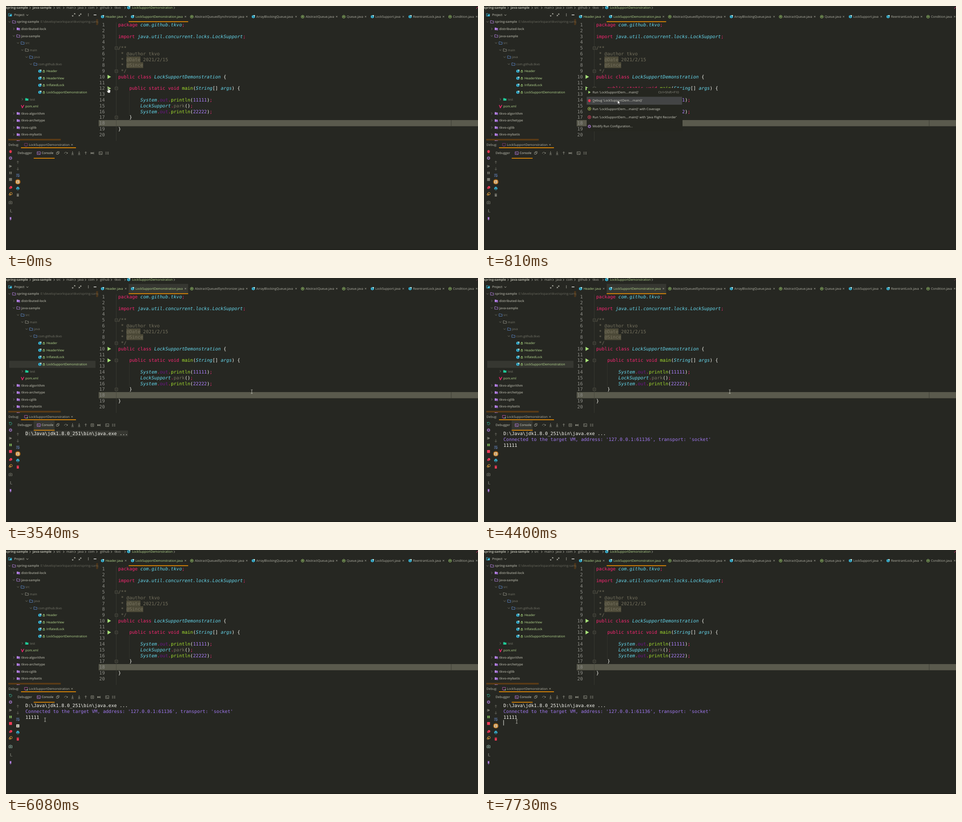
An HTML page with a canvas that plays this animation: 1039 px wide and 539 px high, repeating every 8000 ms.

```html
<!DOCTYPE html>
<html lang="en">
<head>
<meta charset="utf-8">
<title>Debug session</title>
<style>
html, body { margin: 0; width: 100%; height: 100%; overflow: hidden; background: #262722; }
canvas { display: block; }
</style>
</head>
<body>
<canvas id="stage" width="1039" height="539"></canvas>
<script>
const g = document.getElementById('stage').getContext('2d');
const LOOP = 8000, ADV = 6.1, PITCH = 12.77, CODE_X = 247;
const BG = '#262722', ORANGE = '#ff9800', PINK = '#f92672', CYAN = '#66d9ef', GREEN = '#a9dc76';
const PURPLE = '#b884e8', GREY = '#929287', DIM = '#77776b', LIGHT = '#b4b4a8', WHITE = '#f8f8f2';
const TEAL = '#3db8d8', FILE = '#b9dd92', ACTIVE = '#363731';
const UI = '6.93px "Open Sans", sans-serif', MONO = '10.13px "DejaVu Sans Mono", monospace';
const STYLES = { k: PINK, t: CYAN, m: '#a6e22e', n: '#ae81ff', c: '#75715e', w: WHITE, o: '#6e1688' };
g.textRendering = 'geometricPrecision';

const CODE = [
  '~kpackage ~tcom.github.tkvo~k;', '', '~kimport ~tjava.util.concurrent.locks.LockSupport~k;', '',
  '~c/**', '~c * @author tkvo', '~c * @Date 2021/2/15', '~c * @Since', '~c */',
  '~kpublic class ~tLockSupportDemonstration ~w{', '',
  '~w    ~kpublic static void ~mmain~w(~tString~w[] ~targs~w) {', '',
  '~w        ~tSystem~k.~oout~k.~mprintln~w(~n11111~w)~k;',
  '~w        ~tLockSupport~k.~cpark~w()~k;',
  '~w        ~tSystem~k.~oout~k.~mprintln~w(~n22222~w)~k;',
  '~w    }', '', '~w}', ''
];

// level, label, kind
const TREE = [
  [0, 'spring-sample', 'root'], [1, 'distributed-lock', 'module'], [1, 'java-sample', 'root'],
  [2, 'src', 'src'], [3, 'main', 'dir'], [4, 'java', 'src'], [5, 'com.github.tkvo', 'src'],
  [6, 'Header', 'class'], [6, 'HeaderView', 'class'], [6, 'InflatedLock', 'class'],
  [6, 'LockSupportDemonstration', 'class'], [3, 'test', 'test'], [3, 'pom.xml', 'pom'],
  [1, 'tkvo-algorithm', 'module'], [1, 'tkvo-archetype', 'module'],
  [1, 'tkvo-cglib', 'module'], [1, 'tkvo-mybatis', 'module']
];

const TABS = [
  ['Header', 219, 263.5], ['LockSupportDemonstration', 285, 395],
  ['AbstractQueuedSynchronizer', 415.5, 530, 1], ['ArrayBlockingQueue', 551, 638.5],
  ['AbstractQueue', 659.5, 728, 1], ['Queue', 750, 791.5, 1], ['LockSupport', 813, 874.5],
  ['ReentrantLock', 896, 963], ['Condition', 984, 1036, 1]
];

const MENU = [
  ["Run 'LockSupportDem....main()'", 190.5], ["Debug 'LockSupportDem....main()'", 209],
  ["Run 'LockSupportDem....main()' with Coverage", 227.5],
  ["Run 'LockSupportDem....main()' with 'Java Flight Recorder'", 245.5],
  ['Modify Run Configuration...', 266]
];

// time, x, y, shape
const POINTER = [
  [0, 226, 186, 'hand'], [150, 227, 186, 'arrow'], [300, 238, 189, 'arrow'], [420, 262, 197, 'arrow'],
  [540, 283, 204, 'arrow'], [660, 293, 208, 'arrow'], [810, 294, 208, 'arrow'], [2530, 295, 208, 'beam'],
  [2680, 430, 300, 'beam'], [2800, 541, 251, 'beam'], [5360, 506, 265, 'beam'], [5510, 234, 367, 'beam'],
  [5660, 121, 380, 'beam'], [5780, 94, 385, 'beam'], [6080, 86, 375, 'beam'], [6230, 62, 370, 'beam'],
  [6350, 49, 368, 'beam'], [6500, 55, 371, 'beam'], [6620, 88, 378, 'beam'], [6740, 111, 382, 'beam'],
  [7010, 88, 390, 'beam'], [7160, 84.5, 391, 'beam'], [7460, 56, 387, 'beam'], [7610, 62, 383, 'beam'],
  [7730, 72, 379, 'beam']
];

function box(x, y, w, h, color) {
  g.fillStyle = color;
  g.fillRect(x, y, w, h);
}

function text(s, x, y, color = GREY, bold = false) {
  g.font = (bold ? 'bold ' : '') + UI;
  g.fillStyle = color;
  g.fillText(s, x, y + 2.4);
}

function mono(s, x, y, color, italic = false) {
  g.font = (italic ? 'italic ' : '') + MONO;
  g.fillStyle = color;
  g.fillText(s, x, y + 3.5);
}

function icon(x, y, d, color, fill = false, width = 0.9) {
  g.save();
  g.translate(x, y);
  g.fillStyle = g.strokeStyle = color;
  g.lineWidth = width;
  const p = new Path2D(d);
  fill ? g.fill(p) : g.stroke(p);
  g.restore();
}

function dot(x, y, r, color, ring = false) {
  g.beginPath();
  g.arc(x, y, r, 0, 7);
  g.fillStyle = g.strokeStyle = color;
  g.lineWidth = 1;
  ring ? g.stroke() : g.fill();
}

const right = (x, y, c = DIM) => icon(x, y, 'M-1.2-2.2L1.2 0L-1.2 2.2', c);
const down = (x, y, c = DIM) => icon(x, y, 'M-2.2-1.2L0 1.2L2.2-1.2', c);
const cross = (x, y) => icon(x, y, 'M-1.6-1.6L1.6 1.6M1.6-1.6L-1.6 1.6', LIGHT, false, 0.8);
const folder = (x, y, c, fill) => icon(x, y, 'M-3.5-2.7H-.6L.4-1.7H3.5V2.8H-3.5Z', c, fill);
const arrow = (x, y, dir, c = GREY) => icon(x, y, `M0 ${-3 * dir}V${3 * dir}M-2.3 ${dir * .7}L0 ${3 * dir}L2.3 ${dir * .7}`, c);
const terminal = (x, y, c = GREY) => icon(x, y, 'M-3.5-3H3.5V3H-3.5ZM-2-1.4L-.4 0L-2 1.4M.4 1.5H2.2', c);
const list = (x, y) => icon(x, y, 'M-3.5-2.2H-1M.5-2.2H3.5M-3.5 0H-1M.5 0H3.5M-3.5 2.2H-1M.5 2.2H3.5', GREY);
const play = (x, y) => icon(x, y, 'M-3.5-4.5L4.2 0L-3.5 4.5Z', '#a8e27a', true);

function classIcon(x, y, abstract) {
  if (abstract) {
    icon(x, y, 'M-3-1.5L0-3.2L3-1.5V2L0 3.5L-3 2Z', GREEN);
    dot(x, y, 1.3, GREEN);
    return;
  }
  icon(x, y, 'M-3.4-2L0-3.6L3.4-2V2L0 3.7L-3.4 2Z', TEAL, true);
  icon(x, y, 'M-2-1.2L0 0L2-1.2M0 0V2.6', '#17546a', false, 0.8);
  dot(x + 2.3, y - 2.2, 1.3, '#e8f3df');
}

function gear(x, y, c = PURPLE) {
  dot(x, y, 2.1, c, true);
  for (let i = 0; i < 8; i++) {
    const a = i * Math.PI / 4;
    dot(x + 3 * Math.cos(a), y + 3 * Math.sin(a), 0.8, c);
  }
}

function bug(x, y) {
  icon(x, y, 'M-3.2-2L3.2 2M-3.2 2L3.2-2M-3.4 0H3.4', '#e8324f', false, 0.7);
  icon(x, y, 'M0-3.3C3-3.3 3 3.4 0 3.4S-3-3.3 0-3.3', '#f0364f', true);
}

function drawTop(focused) {
  text('spring-sample', -0.5, 4, LIGHT, true);
  text('java-sample', 58.5, 4, LIGHT, true);
  [['src', 111], ['main', 133], ['java', 158], ['com', 181], ['github', 207], ['tkvo', 239]]
    .forEach(([s, x]) => text(s, x, 4, LIGHT));
  [53, 106, 127, 152, 175, 200, 232, 262, 370.5].forEach(x => right(x, 4, LIGHT));
  classIcon(270, 3.5);
  text('LockSupportDemonstration', 277.5, 4, FILE);
  icon(1037, 3, 'M-2 3L2-1', focused ? '#7a4058' : PINK);

  if (focused) box(270, 13, 131, 21, ACTIVE);
  TABS.forEach(([name, x, close, abstract], i) => {
    classIcon(x - 6.5, 23.5, abstract);
    text(name + '.java', x, 23.5, i < 2 ? FILE : LIGHT);
    cross(close, 23.5);
  });
  box(270, 33.8, 131, 1.6, ORANGE);
}

function drawTree(focused) {
  folder(9, 19.5, TEAL);
  box(8, 19, 4, 3.5, TEAL);
  text('Project', 18, 19.8, '#d0d0c4');
  down(47, 20, LIGHT);
  icon(149, 19.5, 'M.8-.8L3-3M.8-3H3V-.8M-.8.8L-3 3M-3 .8V3H-.8', '#d0d0c4');
  icon(163, 19.5, 'M.8-.8L3-3M.8-3V-.8H3M-.8.8L-3 3M-.8 3V.8H-3', '#d0d0c4');
  [-2.3, 0, 2.3].forEach(d => dot(181.3, 19.5 + d, 0.7, '#d0d0c4'));
  box(193, 19, 6, 1.3, WHITE);

  if (focused) box(7, 183, 190, 15.5, ACTIVE);
  g.save();
  g.beginPath();
  g.rect(0, 28, 203, 270);
  g.clip();
  TREE.forEach(([level, label, kind], i) => {
    const y = 35 + 15.56 * i, x = 7.7 + 9.4 * level;
    const bold = kind === 'root' || kind === 'module';
    const leaf = kind === 'class' || kind === 'pom';
    if (!leaf) {
      (kind === 'module' || kind === 'test' ? right : down)(x, y);
      const c = { src: '#5d86c4', test: '#20c997', dir: GREY }[kind] || PURPLE;
      folder(x + 10, y, c, kind === 'test' || kind === 'module');
      if (kind === 'module') box(x + 10.5, y, 3.4, 3.4, '#7d55a8');
      text(label, x + 16.3, y, bold ? GREY : DIM, bold);
    } else if (kind === 'class') {
      classIcon(74.5, y);
      icon(83.2, y, 'M-1.8-.4H1.8V2.5H-1.8ZM-1.1-.4V-2H1.1V-.4', '#9bc873', false, 0.9);
      text(label, 89, y, FILE);
    } else {
      icon(36.5, y, 'M-3-3L-.5 3L3-3', PINK, false, 1.5);
      text(label, 42.5, y, FILE);
    }
  });
  text('E:\\develop\\workspace\\tkvo\\spring-sample', 76, 35, '#6b6b60');
  folder(27, 299, PURPLE, true);
  g.restore();
  box(198.5, 29, 4, 13, 'rgba(130,76,15,.4)');
  box(5, 293.5, 115.5, 3.6, '#5b3b16');
}

function drawEditor(caret) {
  box(204, 252, 835, 13.6, '#5a5a4d');
  box(979.5, 252, 1, 13.6, '#3d3d35');
  box(242.5, 36, 0.7, 262, '#41423a');
  box(271, 188, 0.6, 51, '#3b3c34');
  box(265, 111.5, 31, 12.8, '#4d4a38');
  box(265, 124.3, 37, 12.8, '#4d4a38');
  CODE.forEach((line, i) => {
    const y = 41.5 + PITCH * i;
    g.textAlign = 'right';
    mono(i + 1, 217.5, y, '#90908a');
    g.textAlign = 'left';
    let col = 0;
    for (const part of line.split('~').slice(1)) {
      const s = part.slice(1);
      mono(s, CODE_X + col * ADV, y, STYLES[part[0]], part[0] === 't');
      col += s.length;
    }
  });
  for (const y of [93, 144, 182, 246]) {
    box(239.5, y - 3.5, 7, 7, BG);
    icon(243, y, 'M-3-3H3V3H-3ZM-1.5 0H1.5', '#5d5e52', false, 0.8);
  }
  play(227, 156.5);
  play(227, 182);
  if (caret) box(247, 252, 1, 13, WHITE);
}

function drawDebug(t) {
  const live = t >= 3540;
  const tabOn = live && t < 5660;
  text('Debug:', 5.5, 306.5, LIGHT);
  icon(44, 306.5, 'M-3.3-3H3.3V2.5H-3.3ZM-1.5 3.5H1.5', live ? '#b357a8' : '#7c3b70');
  if (live) dot(47, 309, 1.2, '#6fe08a');
  text('LockSupportDemonstration', 50.5, 306.5, LIGHT);
  cross(145.3, 306.5);
  box(33, 312.4, 121, 1.6, ORANGE);

  text('Debugger', 25.5, 325, '#c2c2b6');
  if (tabOn) box(61, 315, 46, 21, ACTIVE);
  terminal(72, 325, '#b47bd8');
  text('Console', 78.5, 325, '#dadace');
  box(61, 335.6, 46, 1.5, ORANGE);
  icon(114, 324.5, 'M-3-1H1V3H-3ZM-1-1V-3H3V1H1', GREY);
  icon(132, 325, 'M-3.5 1C-3-3 2-3 3 .5M1-.2L3.2 1L3.6-1.6M-.5 2.5H.5', GREY);
  [146.5, 161].forEach(x => { arrow(x, 324, 1); box(x - 2.5, 328, 5, 0.8, GREY); });
  arrow(175.5, 325, -1);
  const shift = live ? 14.5 : 0;
  if (live) icon(190, 325, 'M-3-3H3V3H-3ZM0-2V1M-1.5-.3L0 1.2L1.5-.3', GREY);
  icon(190 + shift, 325, 'M-3.5-2.5L-.3 0L-3.5 2.5ZM-.3-2.5L2.5 0L-.3 2.5ZM2.6-2.5H3.6V2.5H2.6Z', GREY, true);
  terminal(208.3 + shift, 325);
  list(222.5 + shift, 325);

  if (live) {
    icon(10, 321.5, 'M-2.4-1.6A2.9 2.9 0 1 1-2.8 1M-2.8-3.3V-1.2H-.6', '#35b99b');
  } else bug(10, 321.5);
  gear(10, 336);
  icon(10, 354, 'M-3-2.8H-2V2.8H-3ZM-1.2-2.8L3 0L-1.2 2.8Z', '#85857a', true);
  icon(10, 368.7, 'M-2.4-2.7H-.7V2.7H-2.4ZM.7-2.7H2.4V2.7H.7Z', live ? '#9be06d' : '#85857a', true);
  box(6.8, 380, 6.4, 6.4, live ? '#f33b57' : '#77776d');
  dot(11, 400.5, 2.7, '#f33b57');
  dot(9, 402, 2.3, '#c9304a');
  dot(11, 414.5, 2.7, '#e8a23c', true);
  dot(8.5, 416.5, 1.8, '#e8a23c', true);
  const cam = t >= 5660 ? '#8fb5a8' : '#77776d';
  icon(10, 434, 'M-3.5-2H-1.5L-1-3H1L1.5-2H3.5V3H-3.5Z', cam);
  dot(10, 434.3, 1.2, cam, true);
  [-2.2, 0, 2.2].forEach(d => dot(10, 452.5 + d, 0.7, '#d0d0c4'));
  icon(12.5, 455, 'M-1 0H1L0 1Z', '#d0d0c4', true);
  icon(10, 470, 'M-2-3.5H2V-2.5H1.5V0L2.5 1.3H.5V3.7H-.5V1.3H-2.5L-1.5 0V-2.5H-2Z', PURPLE, true);

  arrow(26, 345.5, -1, '#77776d');
  arrow(26, 359.5, 1, '#77776d');
  icon(26, 374, 'M-3.5-2.5H3.5M-3.5 0H2.5C4 0 4 2.6 2.5 2.6H.5M1.6 1.5L.4 2.6L1.6 3.6M-3.5 2.6H-1', '#6b8fd0');
  const lit = t < 6080 || t >= 7160;
  if (lit) dot(26, 388.4, 5.9, '#a8681a');
  box(22.7, 385.2, 6.6, 6.6, lit ? '#f5d8ae' : '#deded5');
  icon(26, 388.4, 'M0-2V1.6M-1.5.2L0 1.8L1.5.2', '#4a3a20');
  icon(26, 403, 'M-2-3.5H2V-1.8H3.5V2H2V3.5H-2V2H-3.5V-1.8H-2Z', '#35a9c8', true);
  box(24.6, 403.8, 2.8, 1.8, BG);
  icon(26, 417.5, 'M-2.8-3H-1V-3.6H1V-3H2.8V-2.1H-2.8ZM-2.3-1.5H2.3V3.5H-2.3Z', live ? '#f33b57' : '#77776d', true);
}

function drawConsole(t) {
  const clicked = t >= 6500 && t < 6860;
  if (t >= 3540 && t < 3690) box(42.5, 337, 226, 12.7, ACTIVE);
  if (clicked) box(42.5, 362.5, 31, 12.7, '#45463b');
  if (t >= 3540) mono('D:\\Java\\jdk1.8.0_251\\bin\\java.exe ...', 42.7, 343.5, WHITE);
  if (t >= 3690) mono("Connected to the target VM, address: '127.0.0.1:61136', transport: 'socket'", 42.7, 356.3, '#a078f0');
  if (t >= 3810) mono('11111', 42.7, 369, WHITE);
  if (t >= 6500) box(42.6, clicked ? 362.8 : 375.6, 1, 12, WHITE);
}

function drawMenu(t) {
  box(226, 181, 211, 96, '#252620');
  if (t < 540) box(226, 182, 210, 18, '#434445');
  else box(226, 200.5, 210, 17.5, '#434445');
  MENU.forEach(([s, y]) => text(s, 239, y, '#d2d2c6'));
  text('Ctrl+Shift+F10', 383.5, 190.5, GREY);
  box(239, 212.2, 5, 0.5, '#d2d2c6');
  icon(232, 190.5, 'M-2.3-3L2.8 0L-2.3 3Z', '#a8e27a', true);
  bug(232, 209);
  dot(232, 227, 3.4, '#b5c94f', true);
  icon(232, 227, 'M-1-1.8L2 0L-1 1.8Z', '#a8e27a', true);
  dot(232, 245.5, 3.4, '#f0466a', true);
  icon(232, 245.5, 'M-1-1.8L2 0L-1 1.8Z', '#f0466a', true);
  gear(232, 266);
}

function drawPointer(t) {
  const [, x, y, shape] = POINTER.findLast(p => p[0] <= t);
  if (shape === 'beam') {
    icon(x, y, 'M-2-4H-.6L0-3.5L.6-4H2M0-3.5V3.5M-2 4H-.6L0 3.5L.6 4H2', '#d6d6cc', false, 0.8);
    return;
  }
  const d = shape === 'arrow'
    ? 'M0 0V8.6L2 6.8L3.4 10L4.8 9.3L3.4 6.3H6.2Z'
    : 'M-1.5-5Q-.6-6 .2-5V-1.4L3.2-.6Q4.2 0 4 1.6L3 6H-1.4L-4 2Q-4 .4-2.6 1L-1.5 2Z';
  icon(x, y, d, WHITE, true);
  icon(x, y, d, '#222', false, 0.6);
}

function draw(t) {
  const between = (a, b) => t >= a && t < b;
  const focused = between(2680, 5660);
  const caret = between(2530, 3260) || between(3810, 4400) || between(4810, 5360);
  box(0, 0, 1039, 539, BG);
  drawTop(focused);
  drawTree(focused);
  drawEditor(caret);
  drawDebug(t);
  drawConsole(t);
  box(0, 537.8, 1039, 1.2, '#1c1d18');
  if (between(150, 2530)) drawMenu(t);
  drawPointer(t);
}

const start = performance.now();
function tick() {
  draw((performance.now() - start) % LOOP);
  requestAnimationFrame(tick);
}
tick();
</script>
</body>
</html>
```
